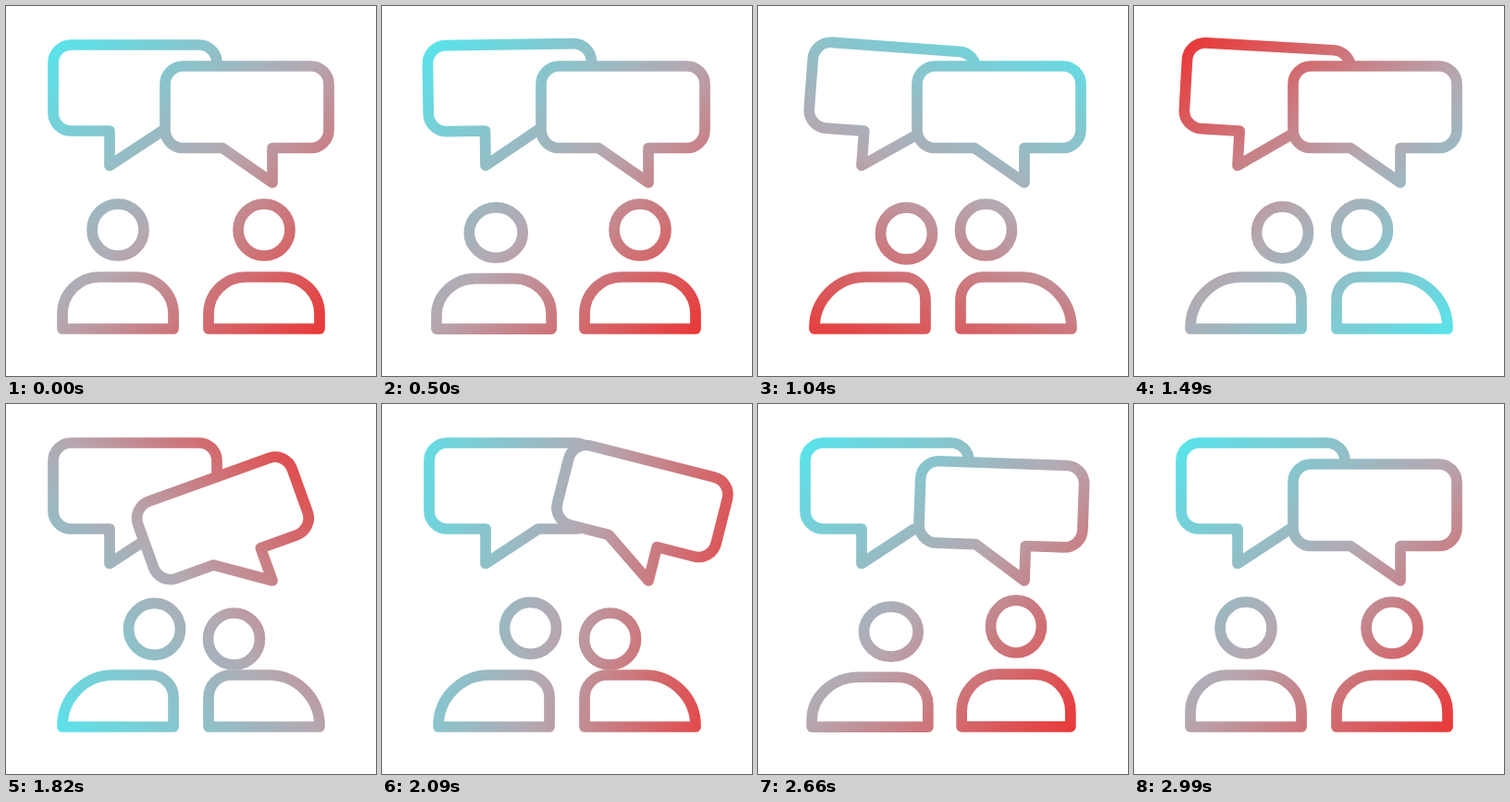
Animation of 400 by 400 pixels, one loop 3020 ms. Source, as an HTML page with a canvas:

```html
<!DOCTYPE html>
<html lang="en">
<head>
<meta charset="utf-8">
<title>Conversation</title>
<style>
  html, body { margin: 0; height: 100%; overflow: hidden; background: #fff; }
  canvas { display: block; width: 100vw; height: 100vh; }
</style>
</head>
<body>
<canvas id="stage" width="400" height="400"></canvas>
<script>
const ctx = document.getElementById('stage').getContext('2d');
const LOOP = 3020, HOLD = 500, STEP = 30;
const START = 470, SWING_BEAT = 232, TURN_TIME = 300, NOD_TIME = 250;

const mix = (a, b, p) => a + (b - a) * p;
const ease = p => (1 - Math.cos(Math.PI * p)) / 2;
const radians = degrees => degrees * Math.PI / 180;

// Eased 0 to 1 over the given span of time.
const ramp = (t, start, duration) =>
  ease(Math.min(1, Math.max(0, (t - start) / duration)));

const people = [
  { mirror: 1, turnIn: 455, turnOut: 2520, reach: 39.5,
    nod: { depth: 4, start: 700, end: 960, fade: 1430 } },
  { mirror: -1, turnIn: 545, turnOut: 2320, reach: 32.5,
    nod: { depth: 12, start: 1550, end: 2270, fade: 430 } }
];
const bubbles = [
  { x: 112, y: 172.5, mirror: 1, top: -130.5, tail: 57, start: START },
  { x: 288, y: 191, mirror: -1, top: -126, tail: 54, start: START + 5 * SWING_BEAT - 30 }
];

// One full turn of the colour direction.
function gradient(t) {
  const a = radians(45 + 360 * ramp(t, START, 2000));
  const dx = 207 * Math.cos(a), dy = 207 * Math.sin(a);
  const g = ctx.createLinearGradient(200 - dx, 196 - dy, 200 + dx, 196 + dy);
  g.addColorStop(0, '#5ce1e9');
  g.addColorStop(0.5, '#b5a8b1');
  g.addColorStop(1, '#e93a3a');
  return g;
}

// Swings of -20, 15, -10 and 5 degrees, one per beat.
function swing(t) {
  const peak = k => k < 1 || k > 5 ? 0 : (-1) ** k * (25 - 5 * k);
  const beat = Math.floor(t / SWING_BEAT);
  return mix(peak(beat), peak(beat + 1), ease(t / SWING_BEAT - beat));
}

// Squash while turning, then a small stretch back.
function squash(t) {
  const p = t / TURN_TIME;
  return p < 0 || p > 1.6 ? 0 : 1.25 * Math.sin(Math.PI * p / 0.8) * (1 - p / 1.6);
}

// Builds the path in a local frame; strokes it unscaled in stage space.
function shape(place, build) {
  ctx.save();
  place();
  ctx.beginPath();
  build();
  ctx.restore();
  ctx.fill();
  ctx.stroke();
}

function drawBubble(b, t) {
  const left = -61, right = 116, bottom = -37.5, r = 19.5;
  shape(() => {
    ctx.translate(b.x, b.y);
    ctx.rotate(radians(swing(t - b.start)));
    ctx.scale(b.mirror, 1);
  }, () => {
    ctx.moveTo(0, 0);
    ctx.lineTo(0, bottom);
    ctx.arcTo(left, bottom, left, b.top, r);
    ctx.arcTo(left, b.top, right, b.top, r);
    ctx.arcTo(right, b.top, right, bottom, r);
    ctx.arcTo(right, bottom, b.tail, bottom, r);
    ctx.lineTo(b.tail, bottom);
    ctx.closePath();
  });
}

function drawPerson({ mirror, turnIn, turnOut, reach, nod }, t) {
  const turn = ramp(t, turnIn, TURN_TIME) - ramp(t, turnOut, TURN_TIME);
  const drop = nod.depth * (ramp(t, nod.start, NOD_TIME) - ramp(t, nod.end, nod.fade));
  const squeeze = squash(t - turnIn) + squash(t - turnOut);
  const place = () => {
    ctx.translate(200 - 79 * mirror, 355);
    ctx.scale(mirror * (1 + 0.055 * squeeze), 1 - 0.042 * squeeze);
  };
  const far = mix(40, 55, turn), near = mix(40, 24, turn);
  shape(place, () => {
    ctx.moveTo(-60, -6);
    ctx.arcTo(-60, -62, 0, -62, far);
    ctx.arcTo(60, -62, 60, -6, near);
    ctx.lineTo(60, -6);
    ctx.closePath();
  });
  shape(place, () => ctx.arc(turn * reach, drop - 113, 28, 0, 2 * Math.PI));
}

function draw(t) {
  ctx.fillStyle = '#fff';
  ctx.fillRect(0, 0, 400, 400);
  ctx.strokeStyle = gradient(t);
  ctx.lineWidth = 11.7;
  ctx.lineJoin = 'round';
  bubbles.forEach(b => drawBubble(b, t));
  people.forEach(p => drawPerson(p, t));
}

function frame() {
  const t = performance.now() % LOOP;
  draw(t < HOLD ? 0 : HOLD + Math.floor((t - HOLD) / STEP) * STEP);
  requestAnimationFrame(frame);
}
frame();
</script>
</body>
</html>
```
